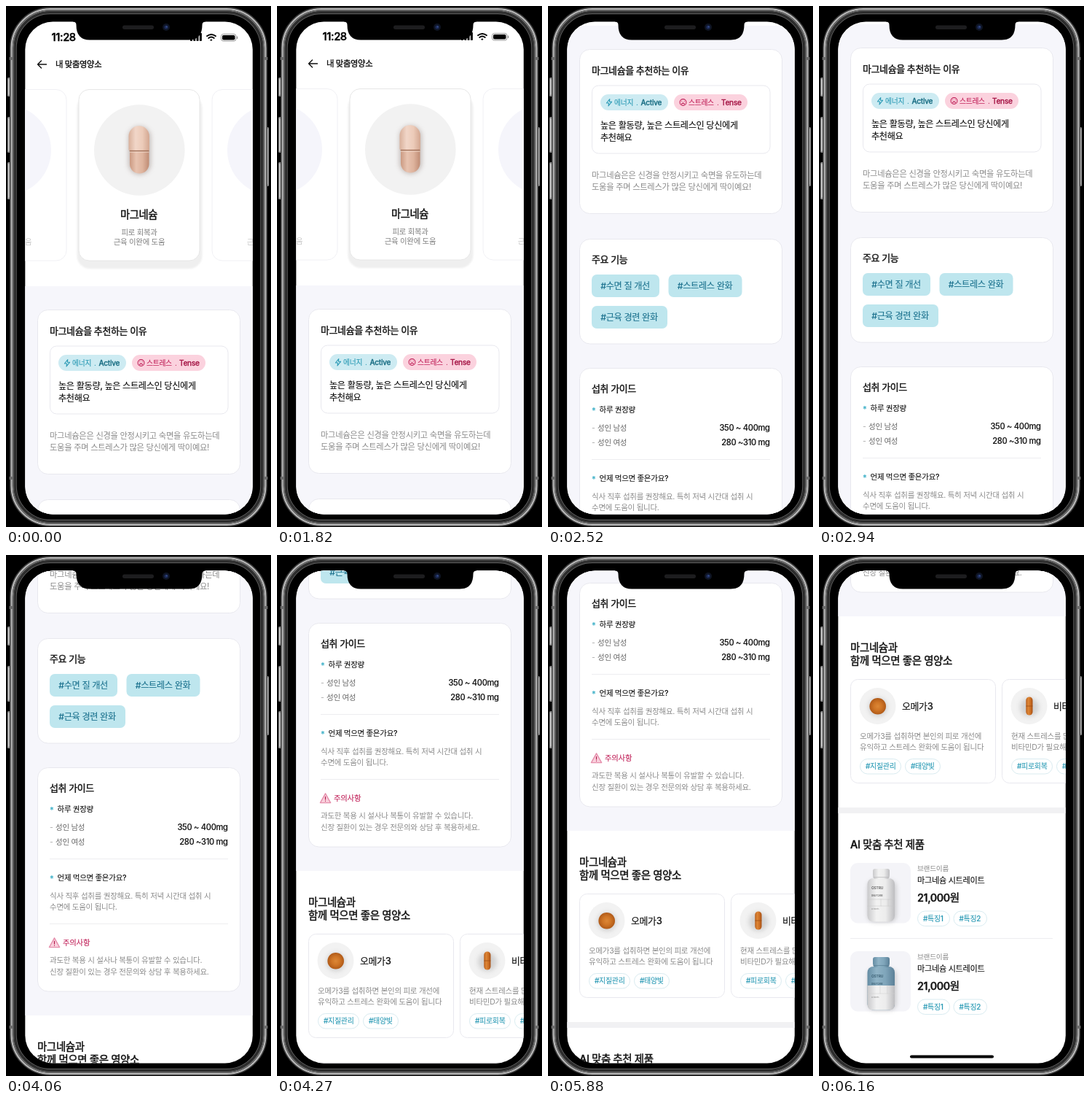
An HTML page for the animation above (8190 ms loop, 364 by 714 pixels).

```html
<!DOCTYPE html>
<html lang="ko">
<head>
<meta charset="utf-8">
<title>맞춤영양소</title>
<style>
html, body { margin: 0; width: 100%; height: 100%; overflow: hidden; background: #000; }
svg { display: block; width: 364px; height: 714px; }
text { font-family: Inter, "Noto Sans CJK KR", "Noto Sans CJK", sans-serif; letter-spacing: -.025em; white-space: pre; }
</style>
</head>
<body>
<svg id="stage" viewBox="0 0 364 714" xmlns="http://www.w3.org/2000/svg"></svg>
<script>
const LOOP = 8190, TICK = 70;
const INK = '#111', GREY = '#8a8a8a', TEAL = '#2a9ab5', ROSE = '#c2255c', LINE = '#e8e8ee';
const TYPE_SCALE = .972;

// Shape helpers; text is placed by the vertical centre of its glyphs.
const rect = (x, y, w, h, r, fill, extra = '') =>
  `<rect x="${x}" y="${y}" width="${w}" height="${h}" rx="${r}" fill="${fill}" ${extra}/>`;
const circle = (x, y, r, fill, extra = '') =>
  `<circle cx="${x}" cy="${y}" r="${r}" fill="${fill}" ${extra}/>`;
const path = (d, stroke, w, fill = 'none') =>
  `<path d="${d}" stroke="${stroke}" stroke-width="${w}" fill="${fill}" stroke-linecap="round" stroke-linejoin="round"/>`;

// Weights between regular and bold are drawn with a thin outline.
function text(x, y, size, str, fill = INK, weight = 400, anchor = 'start') {
  const s = size * TYPE_SCALE;
  const outline = weight > 400 ? `stroke="${fill}" stroke-width="${s * (weight - 450) / 5000}"` : '';
  return `<text x="${x}" y="${y + s * .37}" font-size="${s}" fill="${fill}" font-weight="${Math.min(weight, 500)}" text-anchor="${anchor}" ${outline}>${str}</text>`;
}
const lines = (x, y, gap, size, list, fill, weight, anchor) =>
  list.map((s, i) => text(x, y + i * gap, size, s, fill, weight, anchor)).join('');
const box = (x, y, w, h, r, stroke = LINE) => rect(x, y, w, h, r, '#fff', `stroke="${stroke}"`);
const rule = (x, y, w) => rect(x, y, w, 1, 0, '#ededf0');
const at = (x, y, body) => `<g transform="translate(${x} ${y})">${body}</g>`;
const gradient = (id, stops, kind = 'linear') =>
  `<${kind}Gradient id="${id}">${stops.map((c, i) =>
    `<stop offset="${i / (stops.length - 1)}" stop-color="${c}"/>`).join('')}</${kind}Gradient>`;

const defs = `<defs>
  <clipPath id="screen"><rect x="26.3" y="21.5" width="312.5" height="675" rx="38"/></clipPath>
  <filter id="soft" x="-50%" y="-50%" width="200%" height="200%"><feGaussianBlur stdDeviation="3"/></filter>
  <filter id="edge"><feGaussianBlur stdDeviation="1"/></filter>
  ${gradient('peach', ['#d8b09b', '#f1d6c8', '#eccbb9', '#d3a791'])}
  ${gradient('clay', ['#cb9a82', '#e8c3b0', '#deb39d', '#bf8c74'])}
  ${gradient('amber', ['#b65c1a', '#dd8636', '#cc6f24', '#a54f14'])}
  ${gradient('ball', ['#dc8736', '#cf7526', '#b05a18'], 'radial')}
  ${gradient('white', ['#c9c9cb', '#f2f2f2', '#ececec', '#bdbdc0'])}
  ${gradient('blue', ['#648ca3', '#8fb3c6', '#7fa5ba', '#5b8097'])}
</defs>`;

function statusBar() {
  const bars = [4, 6, 8.5, 11].map((h, i) => rect(253 + i * 4.3, 48 - h, 3, h, .8, '#000')).join('');
  const wifi = path('M276 41.2Q282 36.6 288 41.2M278.2 44Q282 41 285.8 44', '#000', 1.9) +
    path('M281 46.3Q282 45.6 283 46.3L282 47.4Z', '#000', 1, '#000');
  const battery = rect(295.5, 38.5, 20.5, 9.5, 3, '#fff', 'stroke="#999"') +
    rect(297, 40, 17.5, 6.5, 1.8, '#000') + rect(317, 41.5, 1.3, 3.5, .6, '#999');
  return text(62.5, 43, 15.2, '11:28', '#000', 600) + bars + wifi + battery;
}

function carousel() {
  const note = '근육 이완에 도움';
  const side = x => box(x - 83, 114.5, 166, 234.5, 14, '#f0f0f4') + circle(x, 197.5, 62, '#f5f5fb') +
    text(x, 323, 10.7, note, '#c6c6c6', 400, 'middle');
  const pill = rect(168, 165, 31, 66, 15, '#9a8a84', 'opacity=".5" filter="url(#soft)"') +
    rect(170, 186, 26.5, 43.5, 13, 'url(#clay)') +
    path('M168.5 197.5V178.5A14.2 14.2 0 0 1 196.9 178.5V197.5Z', 'none', 0, 'url(#peach)') +
    path('M170 198.6H196', '#a0705a', 1.2) + path('M170.3 200.2H196', '#f3ddd0', .8);
  return side(0) + side(366) +
    rect(97.5, 122, 172, 238, 18, '#efefef', 'filter="url(#edge)"') +
    box(100, 114.5, 166, 234.5, 14, '#e6e6e6') + circle(183.3, 197.5, 62.3, '#f2f2f2') + pill +
    text(182.5, 286, 14.7, '마그네슘', INK, 600, 'middle') +
    lines(183, 310, 13.3, 10.7, ['피로 회복과', note], '#7e7e7e', 400, 'middle');
}

function reasonCard() {
  const bolt = path('M84.8 484.5L80.4 490H83.6L83 494L87.6 488.2H84.4Z', TEAL, 1.1);
  const face = circle(185.5, 489, 4.4, 'none', `stroke="${ROSE}" stroke-width="1.1"`) +
    path('M183.4 491.3Q185.5 488.9 187.6 491.3M183.8 487.6V487.8M187.2 487.6V487.8', ROSE, 1.1);
  return box(43.5, 416.5, 278, 225, 14) +
    text(60, 445, 13.3, '마그네슘을 추천하는 이유', INK, 600) + box(60.5, 466, 244.5, 93, 9) +
    rect(72, 478, 93, 22, 11, '#cdebf2') + bolt + text(91, 489, 10, '에너지', TEAL, 500) +
    text(121, 489, 10, '.', TEAL) + text(127.5, 489, 10.3, 'Active', '#1b6f85', 600) +
    rect(173, 478, 101, 22, 11, '#fbd2de') + face + text(193, 489, 10, '스트레스', ROSE, 500) +
    text(232, 489, 10, '.', ROSE) + text(238, 489, 10.3, 'Tense', '#a81b4a', 600) +
    lines(72, 521, 17, 12.5, ['높은 활동량, 높은 스트레스인 당신에게', '추천해요'], INK, 500) +
    lines(60, 588.5, 16.5, 11.6, ['마그네슘은은 신경을 안정시키고 숙면을 유도하는데',
      '도움을 주며 스트레스가 많은 당신에게 딱이예요!'], GREY);
}

function featureCard() {
  const tag = (x, y, w, s) => rect(x, y, w, 31, 7, '#bee6ee') + text(x + 12.3, y + 15.5, 12.5, s, '#1f7490', 500);
  return box(43.5, 676.5, 278, 143.5, 14) + text(60, 704.5, 13.3, '주요 기능', INK, 600) +
    tag(60, 725, 93, '#수면 질 개선') + tag(165.5, 725, 101, '#스트레스 완화') +
    tag(60, 768, 104, '#근육 경련 완화');
}

function guideCard() {
  const point = (y, s) => text(60, y + 1.5, 11.5, '*', '#39aec6', 500) + text(70.5, y, 10.8, s, INK, 500);
  const dose = (y, who, amount) => text(60, y, 10.8, '-', '#aaa') + text(68, y, 10.8, who, '#666') +
    text(304.7, y, 11.4, amount, INK, 500, 'end');
  const alert = path('M66.5 1086.8L73.6 1099.6H59.4Z', '#e58fac', 1.4, '#f9cfdc') +
    path('M66.5 1091.4V1095M66.5 1097.2V1097.3', '#b01848', 1.2);
  return box(43.5, 853.5, 278, 306.5, 14) + text(60, 881.5, 13.3, '섭취 가이드', INK, 600) +
    point(910.5, '하루 권장량') + dose(935, '성인 남성', '350 ~ 400mg') + dose(955, '성인 여성', '280 ~310 mg') +
    rule(60, 978, 245) + point(1004.5, '언제 먹으면 좋은가요?') +
    lines(60, 1029, 15.3, 10.8, ['식사 직후 섭취를 권장해요. 특히 저녁 시간대 섭취 시', '수면에 도움이 됩니다.'], GREY) +
    rule(60, 1067, 245) + alert + text(78, 1093.5, 10.7, '주의사항', ROSE, 500) +
    lines(60, 1117.5, 15.3, 10.8, ['과도한 복용 시 설사나 복통이 유발할 수 있습니다.',
      '신장 질환이 있는 경우 전문의와 상담 후 복용하세요.'], GREY);
}

const chip = (x, y, w, s) => rect(x + .5, y + .5, w - 1, 20.5, 10.2, '#fff', 'stroke="#d9ebf0"') +
  text(x + 8, y + 10.5, 10.2, s, TEAL, 500);

function pairCard(x, name, pill, note, tags) {
  const chips = tags.map(([dx, w, s]) => chip(dx, 109, w, s)).join('');
  return at(x, 1279, box(.5, .5, 199, 142, 10) + circle(37.5, 37, 25, '#f2f2f2') +
    circle(38, 38.5, 13, '#888', 'opacity=".3" filter="url(#soft)"') + pill +
    text(71, 37, 13.3, name, INK, 500) + lines(13, 78, 15.2, 10.8, note, GREY) + chips);
}

function pairs() {
  const round = circle(37.7, 37.3, 11.3, 'url(#ball)');
  const capsule = rect(33.3, 24.5, 9.2, 25, 4.6, 'url(#amber)') + path('M33.8 37H42', '#9a4d16', .8);
  return lines(43, 1236, 17.5, 14.9, ['마그네슘과', '함께 먹으면 좋은 영양소'], INK, 600) +
    pairCard(43, '오메가3', round, ['오메가3를 섭취하면 본인의 피로 개선에', '유익하고 스트레스 완화에 도움이 됩니다'],
      [[13, 57, '#지질관리'], [75, 49, '#태양빛']]) +
    pairCard(251, '비타민D', capsule, ['현재 스트레스를 많이 받는 당신에게', '비타민D가 필요해요'],
      [[13, 57, '#피로회복'], [75, 49, '#햇빛']]);
}

function bottle(tone) {
  const tinted = tone === 'blue', ink = tinted ? '#33566b' : '#555';
  const base = rect(23.5, 21, 37.5, 59.5, 8, `url(#${tone})`);
  const foot = tinted
    ? '<path d="M23.5 47H61V72.5Q61 80.5 53 80.5H31.5Q23.5 80.5 23.5 72.5Z" fill="url(#white)"/>' +
      path('M41 47V58M51 47V58M24 58H61', '#ccc', .5)
    : path('M24 50H61M24 59H61M42 50V59M52 50V59', '#c4c4c6', .5);
  return rect(24, 24, 39, 57, 9, '#777', 'opacity=".35" filter="url(#soft)"') + base + foot +
    rect(32, 14, 21, 8, 2, `url(#${tone})`) + rect(31, 8, 23, 12, 3, `url(#${tone})`) +
    path('M31.5 19.6H53.5', tinted ? '#557b91' : '#b5b5b7', .7) +
    text(29, 34.5, 5, 'OSTRU', ink, 500) + text(29, 44.5, 2.9, 'DAILY CARE', ink, 500) + text(29, 63, 2.4, '60 tablets', '#888');
}

function product(y, tone) {
  return at(43, y, rect(0, 0, 83, 82.5, 10, '#f4f4f8') + bottle(tone) +
    text(92, 7, 9.9, '브랜드이름', '#888') + text(92, 24, 11.5, '마그네슘 시트레이트', INK, 500) +
    text(92, 48, 14.9, '21,000원', INK, 600) + chip(92, 65.5, 45, '#특징1') + chip(141.5, 65.5, 46.5, '#특징2'));
}

const page = rect(26, -20, 313, 1860, 0, '#fff') + rect(26, 384, 313, 809, 0, '#f6f6fb') + statusBar() +
  path('M55.5 80H43.5M48.5 75L43.5 80L48.5 85', INK, 1.4) + text(68, 80, 11.6, '내 맞춤영양소', INK, 600) +
  carousel() + reasonCard() + featureCard() + guideCard() + pairs() +
  rect(26, 1455, 313, 8, 0, '#f1f1f3') + text(43, 1505.5, 14.9, 'AI 맞춤 추천 제품', INK, 600) +
  product(1531, 'white') + rule(43, 1634, 278) + product(1652, 'blue') +
  rect(125, 1794.5, 115, 4, 2, '#000');

function phone() {
  const ring = (inset, w, color) => rect(5 + inset, 1.5 + inset, 354 - 2 * inset, 712 - 2 * inset, 56 - inset,
    'none', `stroke="${color}" stroke-width="${w}"`);
  const button = (x, y, h) => rect(x, y, 4, h, 1.5, '#8f8f8f') + rect(x + 1.2, y + 2, 1.4, h - 4, .7, '#d0d0d0');
  const bands = [70, 645].map(y => rect(4.5, y, 5, 4, 0, '#6b6b6b') + rect(354.5, y, 5, 4, 0, '#6b6b6b')).join('');
  return button(2, 98, 26) + button(2, 152, 49) + button(2, 214, 51) + button(357, 166, 81) +
    rect(5, 1.5, 354, 712, 56, '#000') + ring(.7, 1.4, '#3c3c3c') + ring(2.6, 2.4, '#b8b8b8') +
    ring(4.8, 2, '#6c6c6c') + ring(7, 2.4, '#303030') + ring(9.2, 1.2, '#5c5c5c') + bands;
}

const notch = `<path d="M92 20H274V21.5Q269.5 21.5 269.5 26Q269.5 46.5 251 46.5H115Q96.5 46.5 96.5 26Q96.5 21.5 92 21.5Z" fill="#000"/>` +
  rect(160, 26.5, 43, 5.5, 2.7, '#1d1d1f') + circle(220, 29, 5, '#0e1423') + circle(220, 29, 2.6, '#1c2b57') +
  circle(220.6, 28.4, 1, '#3d5596');

const stage = document.getElementById('stage');
stage.innerHTML = defs + phone() + `<g clip-path="url(#screen)"><g id="page">${page}</g></g>` + notch;
const scroller = document.getElementById('page');

const linear = u => u;
const easeIn = u => u * u;
const easeOut = u => 1 - (1 - u) ** 4;
const smooth = u => u * u * (3 - 2 * u);

// Each swipe: start ms, end ms, distance, easing.
const swipes = [
  [1800, 2170, 234, easeIn], [2170, 2590, 123, easeOut], [2730, 2940, 2, linear],
  [3792, 4340, 420, smooth], [4480, 4690, 2, linear],
  [5810, 6160, 328, smooth]
];

const scrollAt = t => swipes.reduce((sum, [from, to, dist, ease]) =>
  sum + dist * ease(Math.min(1, Math.max(0, (t - from) / (to - from)))), 0);

function draw(now) {
  const t = Math.floor((now % LOOP) / TICK) * TICK;
  scroller.setAttribute('transform', `translate(0 ${-Math.round(scrollAt(t))})`);
}

function loop() {
  draw(performance.now());
  requestAnimationFrame(loop);
}
loop();
</script>
</body>
</html>
```
